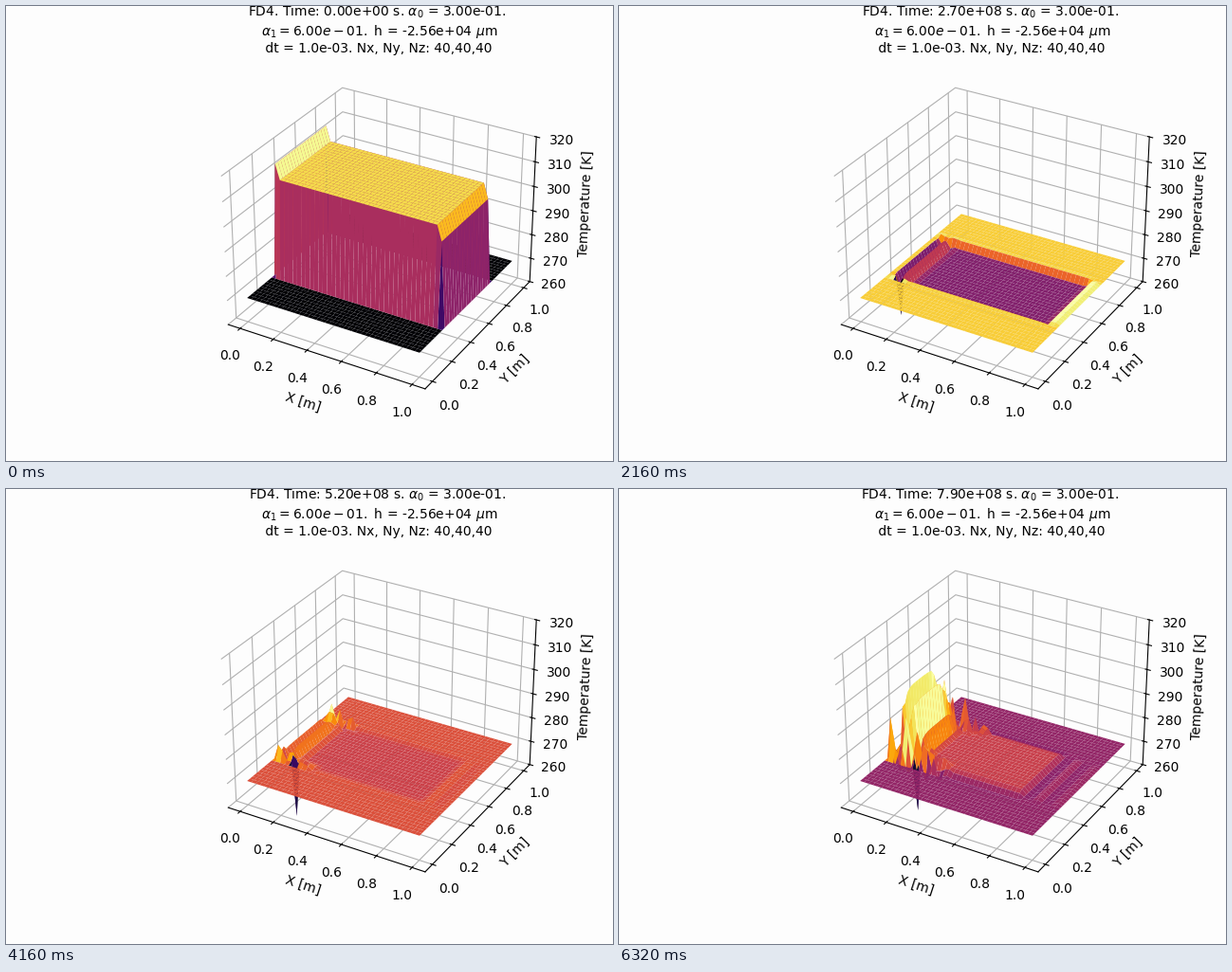
Animation of 640 by 480 pixels, one loop 6.4 s. Source, as a matplotlib script:

```python
import numpy as np
import matplotlib.pyplot as plt
from matplotlib.animation import FuncAnimation

N = 40                 # grid points per side
FRAMES = 80
AMBIENT = 270.0
PERIOD = 32            # frames per swing of the plateau
PAPER = "#fdfdfd"

# Key points: position of the ambient level within the colour range
TONE_TIMES = [0, 12, 27, 45, 59, 72, 79]
TONES = [0, 0.03, 0.88, 0.48, 0.71, 0.31, 0.40]

rng = np.random.RandomState(4)
phase = rng.uniform(-np.pi, np.pi, (N, N))
weight = rng.uniform(0.3, 1.0, (N, N))

I, J = np.meshgrid(np.arange(N), np.arange(N), indexing="ij")
X, Y = I / (N - 1), J / (N - 1)
inside = (I >= 1) & (I <= N - 2) & (J >= 10) & (J <= 29)
side = np.clip(np.minimum(J - 10, 29 - J), 0, None)
right = np.clip(N - 2 - I, 0, None)


def swing(t):
    return -np.cos(2 * np.pi * (t - 27) / PERIOD)


def level(t):
    """Plateau above ambient: fast cooling, then a slow swing."""
    cooling = np.exp(-t / 5)
    return 40 * cooling + 2.7 * (1 - cooling) * swing(t)


def edge(depth, reach):
    """Damped ripples behind a front that has come in by `reach` cells."""
    s = np.maximum(reach - depth, 0)
    wave = np.cos(np.pi * s / 2) * np.exp(-s / 6)
    return np.where(wave < 0, 0.45 * wave, wave)


def heights(t):
    u = level(t) * edge(right, t * t / (9 * (t + 8)))
    u *= edge(side, 0.9 * (t / 12) ** 0.3)

    # heated and cooled sides
    u[1] += 6 * np.exp(-t / 14)
    u[N - 2] -= 6 * np.exp(-t / 4)

    # growing zigzag beside the heated side, ragged towards its corners
    growth = 0.0042 * t * t
    ragged = np.exp(-(side / (0.3 + t / 30)) ** 2)
    packet = np.exp(-((I - 2.5) / (1.2 + t / 40)) ** 2)
    zigzag = (-1.0) ** I * swing(t) + 0.15 + 0.1 * swing(t)
    u += growth * packet * zigzag * (1 - ragged)

    spikes = weight * np.cos(phase + 0.45 * t)
    spikes = np.where(spikes < 0, 0.5 * spikes, spikes)
    u += growth * spikes * ragged * np.clip(1 - I / (1 + 0.18 * t), 0, 1)

    # deep dip travelling along the front edge
    u[1 + int(t / 12), 10] -= 21 * (1 - np.exp(-(t / 24) ** 4))
    return AMBIENT + np.where(inside, u, 0)


def color_range(t):
    span = 43 * np.exp(-t / 6) + 1 + 6.5 * (1 - np.cos(np.pi * t / 80))
    low = AMBIENT - span * np.interp(t, TONE_TIMES, TONES)
    return low, low + span


fig = plt.figure(figsize=(6.4, 4.8), dpi=100, facecolor=PAPER)
ax = fig.add_subplot(projection="3d", facecolor=PAPER)
ax.set_anchor("E")
margin = 0.05 + 1.1 / 48
ax.set_xlim(-margin, 1 + margin)
ax.set_ylim(-margin, 1 + margin)
ax.set_zlim(260, 320)
ax.set_xlabel("X [m]")
ax.set_ylabel("Y [m]")
ax.set_zlabel("Temperature [K]")
for axis in (ax.xaxis, ax.yaxis, ax.zaxis):
    axis.set_pane_color((1, 1, 1, 0))

surface = None


def draw(t):
    global surface
    if surface is not None:
        surface.remove()
    low, high = color_range(t)
    surface = ax.plot_surface(X, Y, heights(t), cmap="inferno",
                              vmin=low, vmax=high)
    ax.set_title(
        f"FD4. Time: {t * 1e7:.2e} s. $\\alpha_0$ = 3.00e-01.\n"
        " $\\alpha_1 = 6.00e-01.$ h = -2.56e+04 $\\mu$m\n"
        " dt = 1.0e-03. Nx, Ny, Nz: 40,40,40", fontsize=10)
    return [surface]


anim = FuncAnimation(fig, draw, frames=FRAMES, interval=80,
                     init_func=lambda: [], repeat=True, repeat_delay=0)
plt.show()
```
